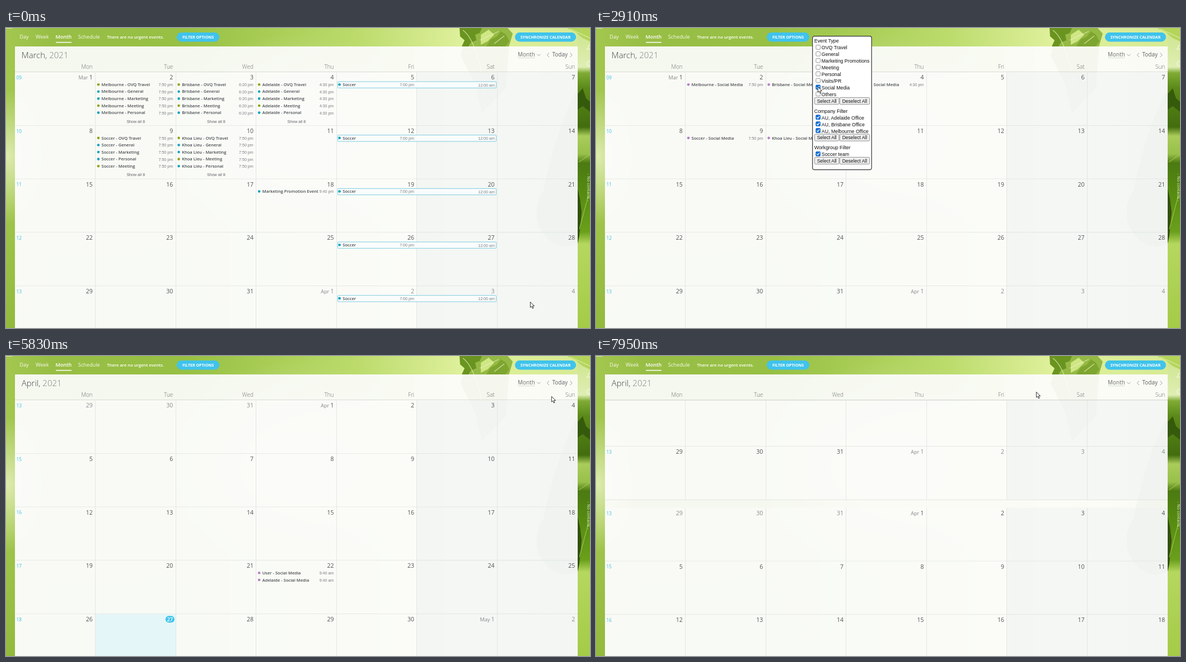
Write an HTML page that moves like this. It is 1043 px wide and 537 px high and loops after 8000 ms.

```html
<!DOCTYPE html>
<html lang="en">
<head>
<meta charset="utf-8">
<title>Calendar filter</title>
<style>
html, body { margin: 0; width: 100%; height: 100%; overflow: hidden; background: #a5c84a; }
svg { display: block; width: 100%; height: 100%; }
text { font-family: "Open Sans", "Noto Sans", sans-serif; white-space: pre; }
text.ui { font-family: "Liberation Sans", Arial, sans-serif; }
</style>
</head>
<body>
<svg id="stage" viewBox="0 0 1043 537" preserveAspectRatio="none">
  <defs>
    <linearGradient id="sky">
      <stop offset="0" stop-color="#a3c74f"/><stop offset=".08" stop-color="#98be45"/>
      <stop offset=".3" stop-color="#97c044"/><stop offset=".45" stop-color="#a8cd55"/>
      <stop offset=".6" stop-color="#bbdb6b"/><stop offset=".7" stop-color="#cfe787"/>
      <stop offset=".78" stop-color="#def09b"/><stop offset="1" stop-color="#d6ea94"/>
    </linearGradient>
    <linearGradient id="low" x2="0" y2="1">
      <stop offset=".55" stop-color="#84ad2c" stop-opacity="0"/><stop offset="1" stop-color="#84ad2c" stop-opacity=".5"/>
    </linearGradient>
    <linearGradient id="edge" x2="0" y2="1">
      <stop offset="0" stop-color="#cde48a"/><stop offset=".13" stop-color="#dfeeb4"/>
      <stop offset=".15" stop-color="#7fab34"/><stop offset=".2" stop-color="#5b8a1a"/>
      <stop offset=".33" stop-color="#436d0e"/><stop offset=".36" stop-color="#a9cc5a"/>
      <stop offset=".42" stop-color="#98c04a"/><stop offset=".45" stop-color="#4b7a12"/>
      <stop offset=".56" stop-color="#578c12"/><stop offset=".68" stop-color="#6ba01c"/>
      <stop offset=".72" stop-color="#b5d75e"/><stop offset="1" stop-color="#a4cb48"/>
    </linearGradient>
    <radialGradient id="glow">
      <stop offset="0" stop-color="#e0edb4" stop-opacity=".95"/><stop offset="1" stop-color="#e0edb4" stop-opacity="0"/>
    </radialGradient>
    <clipPath id="view"><rect x="16" y="80" width="1005" height="457"/></clipPath>
  </defs>
  <rect width="1043" height="537" fill="url(#sky)"/>
  <rect width="400" height="537" fill="url(#low)"/>
  <ellipse cx="4" cy="230" rx="70" ry="120" fill="url(#glow)"/>
  <ellipse cx="520" cy="200" rx="260" ry="190" fill="url(#glow)"/>
  <path d="M1021 0H1043V537H1021Z" fill="url(#edge)"/>
  <path d="M1021 110Q985 170 960 290Q930 340 970 380Q1000 400 1021 385Z" fill="#84ac3a"/>
  <path d="M1021 288L1025 305L1028 330L1024 372L1021 386Z" fill="#33520c"/>
  <path d="M1021 118L1030 108L1036 126L1043 132V150L1030 140L1021 146Z" fill="#365a0c"/>
  <path d="M812 0H896L905 10L898 34L893 108L850 152L838 100L812 50L820 20Z" fill="#94b944"/>
  <path d="M810 0H850L846 9L838 12L840 22L830 26L826 33H814L819 22L811 15Z" fill="#6a9420"/>
  <path d="M858 33L866 20L876 16L884 6L893 12L899 24L892 33Z" fill="#7ea52f"/>
  <path d="M848 12L862 3L872 12L860 24L848 30Z" fill="#cfe684"/>
  <path d="M1002 0H1043V24L1030 18L1018 8Z" fill="#b4d55a"/>
  <g fill="none" stroke="#e9f4bd" stroke-width="1.2" opacity=".75">
    <path d="M816 4Q842 22 856 120M846 22L880 6M872 28L890 14M1008 2L1043 18"/>
    <path d="M1024 360L1040 300M1023 240L1043 226" stroke="#a9cc55"/>
  </g>
  <g fill="none" stroke="#fff">
    <path d="M0 .5H12" opacity=".6"/>
    <path d="M1037 38Q1040 36 1040 32L1043 29M1037 38H1043" opacity=".8"/>
    <path d="M1043 60Q1037 60 1037.5 64.500Q1038 68 1043 68" opacity=".8"/>
  </g>
  <rect x="16" y="33" width="1005" height="504" fill="#fdfdfd" opacity=".92"/>
  <g id="months" clip-path="url(#view)"></g>
  <path d="M16 78.500H1021" stroke="#d9dcd6"/>
  <path id="shade" d="M16 79.500H1021" stroke="#9aa09a" stroke-opacity=".18"/>
  <g id="chrome"></g>
  <g id="popup"></g>
  <g id="pointer" stroke="#222" stroke-linejoin="round" fill="#fff">
    <path id="arrow" d="M.4 .4V10.200L2.700 8.200L4.300 12L6 11.300L4.400 7.600H7.600Z" stroke-width=".9"/>
    <path id="hand" d="M-.9 8V1Q-.9 0 .1 0T1.100 1V5.500Q2.600 4.600 3.300 5.800Q4.600 5.100 5.300 6.300Q7 6 7 7.500V10.500Q7 12.500 5.700 13.500V15H-.3V13.800L-3.600 9.600Q-4.200 8.100-2.700 7.900Z" stroke-width="1"/>
  </g>
</svg>
<script>
const LOOP = 8000, LEFT = 16, TOP = 79, COL = 1005 / 7, ROW = 95.67;
const OLIVE = '#93a414', TEAL = '#12a4bf', PURPLE = '#b67fc8', CYAN = '#40c3ec';
const $ = id => document.getElementById(id);

function el(parent, tag, attrs = {}) {
  const node = document.createElementNS('http://www.w3.org/2000/svg', tag);
  for (const key in attrs) node.setAttribute(key, attrs[key]);
  return parent.appendChild(node);
}

// y is the middle of the capitals
function label(parent, str, x, y, size, fill, attrs = {}) {
  const node = el(parent, 'text', { x, y: y + size * 0.357, 'font-size': size, fill, ...attrs });
  node.textContent = str;
  return node;
}

const END = { 'text-anchor': 'end' }, MID = { 'text-anchor': 'middle' };
const UI = { class: 'ui' }, LIGHT = { 'font-weight': 300 };
const show = (node, on) => node.setAttribute('display', on ? 'inline' : 'none');
const colX = col => LEFT + col * COL;

// Calendar pages

function drawMonth(month) {
  const g = el($('months'), 'g');
  for (let r = 0; r < 5; r++) {
    const y = r * ROW;
    el(g, 'rect', { x: LEFT, y, width: COL * 5, height: ROW, fill: '#fdfdfd', opacity: 0.5 });
    el(g, 'rect', { x: colX(5), y, width: COL * 2, height: ROW, fill: '#eaeff1', opacity: 0.45 });
    label(g, month.weeks[r], 18.6, y + 10, 8.3, '#3dbfe2');
    for (let c = 0; c < 7; c++) drawDay(g, month, r, c);
    el(g, 'path', { d: `M${LEFT} ${y + ROW - 0.2}H1021`, stroke: '#e2e6e0' });
  }
  for (let c = 1; c < 7; c++) {
    el(g, 'path', { d: `M${Math.floor(colX(c)) + 0.5} 0V${ROW * 5}`, stroke: '#e3e7e2' });
  }
  return g;
}

function drawDay(g, month, r, c) {
  const n = r * 7 + c + month.shift, x = colX(c + 1) - 4.8, y = r * ROW + 9.6;
  const before = n < 1, after = n > month.days;
  const day = before ? n + month.daysBefore : after ? n - month.days : n;
  if (month.today === n) {
    el(g, 'rect', { x: colX(c), y: r * ROW, width: COL, height: ROW, fill: '#e4f6f7' });
    el(g, 'rect', { x: x - 13.5, y: y - 6, width: 16, height: 12, rx: 6, fill: CYAN });
    label(g, day, x - 5.5, y, 9.5, '#fff', { ...MID, 'font-weight': 600 });
    return;
  }
  const text = label(g, '', x, y, 10.5, before || after ? '#8b8e8f' : '#505456', END);
  if (day === 1) {
    const name = el(text, 'tspan', { 'font-size': 9, fill: '#838687' });
    name.textContent = (after ? month.next : month.name) + ' ';
  }
  el(text, 'tspan').textContent = day;
}

function drawEvent(g, row, col, line, who, kind, time) {
  const x = colX(col), y = row * ROW + 22.2 + line * 12.6;
  const fill = kind === 'Social Media' ? PURPLE : /Travel|Meeting/.test(kind) ? OLIVE : TEAL;
  el(g, 'circle', { cx: x + 5.4, cy: y, r: 2.3, fill });
  label(g, who ? `${who} - ${kind}` : kind, x + 11, y, 7.55, '#474c50', { 'font-weight': 600 });
  label(g, time, x + COL - 5, y + 0.4, 7.1, '#7b7f82', { ...UI, ...END });
}

function drawSoccerBar(g, row) {
  const y = row * ROW;
  el(g, 'rect', { x: 592.5, y: y + 17, width: 283, height: 11.3, rx: 1, fill: '#fafcfc', stroke: '#7fcbe0' });
  drawEvent(g, row, 4, 0, '', 'Soccer', '7:00 pm');
  label(g, '12:00 am', 872.8, y + 23, 7.1, '#7b7f82', { ...UI, ...END });
}

const march = drawMonth({ name: 'Mar', next: 'Apr', shift: 1, days: 31, weeks: ['09', '10', '11', '12', '13'] });
const april = drawMonth({ name: 'Apr', next: 'May', shift: -2, days: 30, daysBefore: 31, today: 27,
  weeks: ['13', '15', '16', '17', '18'] });
const allEvents = el(march, 'g'), socialEvents = el(march, 'g');

const TRAVEL = 'OVQ Travel';
const kinds = [TRAVEL, 'General', 'Marketing', 'Meeting', 'Personal'];
const teamKinds = [TRAVEL, 'General', 'Marketing', 'Personal', 'Meeting'];
[
  [0, 1, 'Melbourne', '7:50 pm', kinds],
  [0, 2, 'Brisbane', '6:20 pm', kinds],
  [0, 3, 'Adelaide', '4:30 pm', kinds],
  [1, 1, 'Soccer', '7:50 pm', teamKinds],
  [1, 2, 'Khoa Lieu', '7:50 pm', kinds]
].forEach(([row, col, who, time, list]) => {
  list.forEach((kind, i) => drawEvent(allEvents, row, col, i, who, kind, time));
  label(allEvents, 'Show all 8', colX(col + 0.5) + 0.4, row * ROW + 88, 7.1, '#606467', { ...UI, ...MID });
  drawEvent(socialEvents, row, col, 0, who, 'Social Media', time);
});
drawEvent(allEvents, 2, 3, 0, '', 'Marketing Promotion Event', '9:40 pm');
for (let r = 0; r < 5; r++) drawSoccerBar(allEvents, r);
['User', 'Adelaide'].forEach((who, i) => drawEvent(april, 3, 3, i, who, 'Social Media', '9:40 am'));

// Toolbar and header

const chrome = $('chrome');

function pill(x, width, str) {
  el(chrome, 'rect', { x, y: 8, width, height: 16.5, rx: 8.2, fill: CYAN });
  label(chrome, str, x + width / 2, 16.2, 7.05, '#fff', { ...MID, 'font-weight': 700 });
}

label(chrome, 'Day', 24.2, 15.8, 9.2, '#f7faee');
label(chrome, 'Week', 53, 15.8, 9.2, '#f7faee');
label(chrome, 'Month', 88.4, 15.8, 9, '#fff', { 'font-weight': 600 });
label(chrome, 'Schedule', 128.7, 15.8, 9.2, '#f7faee');
el(chrome, 'path', { d: 'M89 25.700H117', stroke: '#fff', 'stroke-width': 1.5 });
label(chrome, 'There are no urgent events.', 180.3, 16, 7.65, '#fff', { 'font-weight': 600 });
pill(305, 76, 'FILTER OPTIONS');
pill(909, 109, 'SYNCHRONIZE CALENDAR');

const title = label(chrome, '', 27.7, 48.2, 15, '#3f4346', LIGHT);
const titleMonth = el(title, 'tspan');
el(title, 'tspan', { fill: '#7d8183' }).textContent = '2021';

['Mon', 'Tue', 'Wed', 'Thu', 'Fri', 'Sat', 'Sun'].forEach((name, i) =>
  label(chrome, name, colX(i + 1) - 4.8, 69.8, 10, '#6b6f71', { ...LIGHT, ...END }));

label(chrome, 'Month', 914, 47.8, 10, '#6a6f72');
el(chrome, 'path', { d: 'M915 53.500H944', stroke: '#b2b6b5', 'stroke-dasharray': '1 1' });
label(chrome, 'Today', 975.5, 47.8, 10, '#5c6164');
const chevron = d => el(chrome, 'path', { d, fill: 'none', stroke: '#9a9e9f', 'stroke-width': 1 });
chevron('M948.500 46.800L951.500 49.800L954.500 46.800');
const prev = chevron('M970 44.500L966.500 48.300L970 52.100');
const next = chevron('M1007.500 44.500L1011 48.300L1007.500 52.100');

label(chrome, '- No contacts -', 0, 0, 7.4, '#f4f8ea', { transform: 'translate(1041 261) rotate(90)', opacity: 0.9 });

// Filter popup

const popup = $('popup');
el(popup, 'rect', { x: 386.7, y: 14.7, width: 105.5, height: 239, rx: 3.5, fill: '#fff', stroke: '#333', 'stroke-width': 1.2 });

function checkbox(str, y) {
  const cy = y - 0.8;
  el(popup, 'rect', { x: 392.9, y: cy - 3.9, width: 7.6, height: 7.6, rx: 1.4, fill: '#fff', stroke: '#767676', 'stroke-width': 0.8 });
  const tick = el(popup, 'g');
  el(tick, 'rect', { x: 392.5, y: cy - 4.3, width: 8.4, height: 8.4, rx: 1.5, fill: '#0f6fd6' });
  el(tick, 'path', { d: `M394.300 ${cy}l1.700 1.900l3.300 -4.100`, fill: 'none', stroke: '#fff', 'stroke-width': 1.3 });
  label(popup, str, 402.8, y, 8.8, '#111', UI);
  return tick;
}

function button(str, x, width, y) {
  el(popup, 'rect', { x, y: y - 6.2, width, height: 12.2, rx: 1.8, fill: '#efefef', stroke: '#767676', 'stroke-width': 0.8 });
  label(popup, str, x + width / 2, y, 8.5, '#111', { ...UI, ...MID });
}

function section(name, y, items, buttonY) {
  label(popup, name, 389.8, y, 8.8, '#111', UI);
  const list = items.map((item, i) => checkbox(item, y + 12 + i * 11.93));
  button('Select All', 390.4, 43.6, buttonY);
  button('Deselect All', 435.2, 53.4, buttonY);
  return list;
}

const typeTicks = section('Event Type', 23.3, [TRAVEL, 'General', 'Marketing Promotions', 'Meeting', 'Personal',
  'Visits/PR', 'Social Media', 'Others'], 130.6);
section('Company Filter', 148.6, ['AU, Adelaide Office', 'AU, Brisbane Office', 'AU, Melbourne Office'], 196.2);
section('Workgroup Filter', 214.2, ['Soccer team'], 237.6);

// Motion

const path = [
  [0, 936, 490], [60, 936, 490], [440, 690, 250], [810, 420, 38], [980, 347, 11], [1420, 347, 11],
  [1800, 425, 92], [2120, 453, 129], [2420, 453, 129], [2780, 396, 105], [2960, 396, 105],
  [3280, 350, 11], [3400, 350, 11], [3700, 679, 57], [4180, 1008, 47], [4735, 1008, 47],
  [4820, 999, 58], [5220, 994, 70], [5370, 991, 73], [5580, 991, 73], [5830, 974, 72],
  [6380, 967, 53], [7150, 967, 53], [7500, 1005, 50], [7640, 1005, 49], [7710, 1003, 50], [7950, 786, 64], [8000, 742, 66]
];

function cursorAt(t) {
  t = Math.max(t, 0);
  const i = Math.max(1, path.findIndex(p => p[0] >= t));
  const [t0, x0, y0] = path[i - 1], [t1, x1, y1] = path[i];
  const k = (t - t0) / (t1 - t0);
  return [x0 + (x1 - x0) * k, y0 + (y1 - y0) * k];
}

const near = ([x, y], cx, rx, cy, ry) => Math.abs(x - cx) <= rx && Math.abs(y - cy) <= ry;
const overPrev = p => near(p, 968, 5, 48, 7);
const overNext = p => near(p, 1008, 6, 48, 7);
const overFilter = p => near(p, 343, 38, 16, 8);

function ramp(t, start) {
  const u = Math.min(1, Math.max(0, (t - start) / 400));
  return u < 0.5 ? 2 * u * u : 1 - 2 * (1 - u) ** 2;
}

const FORWARD = 4696, BACK = 6430, AGAIN = 7726;

function render(t) {
  const p = ramp(t, FORWARD) - ramp(t, BACK) + ramp(t, AGAIN);
  march.setAttribute('transform', `translate(0 ${TOP - 489.2 * p})`);
  april.setAttribute('transform', `translate(0 ${TOP + 497.5 * (1 - p)})`);
  show(march, p < 1);
  show(april, p > 0);
  show($('shade'), p > 0 && p < 1);
  titleMonth.textContent = t >= AGAIN || (t >= FORWARD && t < BACK) ? 'April, ' : 'March, ';

  show(allEvents, t < 2320);
  show(socialEvents, t >= 2900);
  show(popup, t >= 1250 && t < 3370);
  typeTicks.forEach((tick, i) => show(tick, t < 2270 || (i === 6 && t >= 2840)));

  const tip = cursorAt(t), lag = cursorAt(t - 90);
  prev.setAttribute('stroke', overPrev(lag) ? '#3c4144' : '#9a9e9f');
  next.setAttribute('stroke', overNext(lag) ? '#3c4144' : '#9a9e9f');
  const hand = overPrev(tip) || overNext(tip) || overFilter(tip);
  show($('hand'), hand);
  show($('arrow'), !hand);
  $('pointer').setAttribute('transform', `translate(${tip[0].toFixed(1)} ${tip[1].toFixed(1)})`);
}

let begin;
function tick(now) {
  begin ??= now;
  render((now - begin) % LOOP);
  requestAnimationFrame(tick);
}
render(0);
requestAnimationFrame(tick);
</script>
</body>
</html>
```
